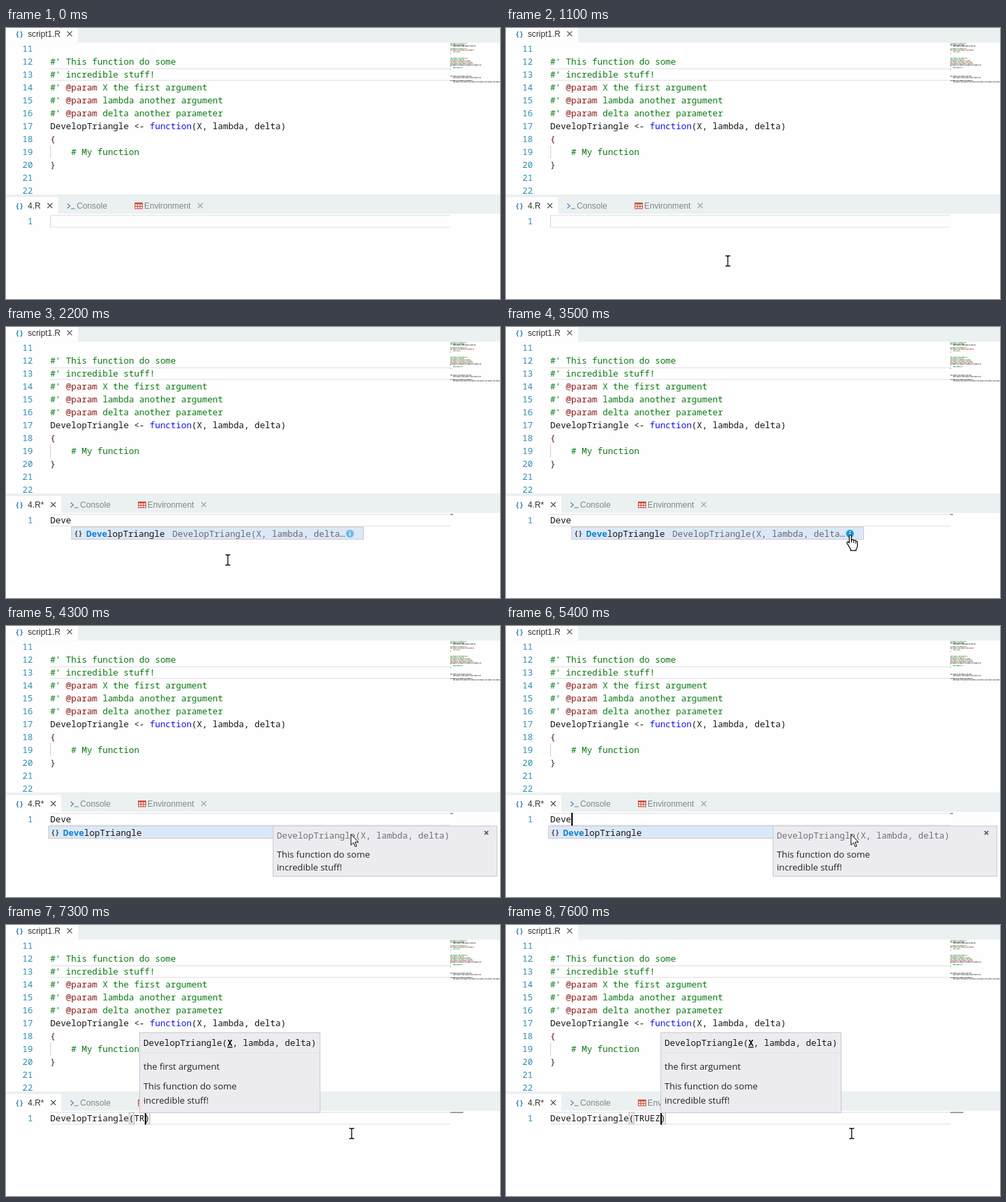
An HTML page for the animation above (8000 ms loop, 726 by 399 pixels).

```html
<!DOCTYPE html>
<html lang="en">
<head>
<meta charset="utf-8">
<title>Editor with completion</title>
<style>
html, body { margin: 0; width: 726px; height: 399px; overflow: hidden; background: #fefefe; }
svg { display: block; }
text { white-space: pre; }
.mono { font: 12.83px "Noto Sans Mono", monospace; }
.ui { font: 12.2px "Liberation Sans", Arial, sans-serif; }
.body { font: 13.25px "Open Sans", sans-serif; }
.icon { font: bold 10.5px "Noto Sans Mono", monospace; }
.bold { font-weight: bold; }
</style>
</head>
<body>
<svg width="726" height="399" viewBox="0 0 726 399">
  <g id="still"></g>
  <g id="live"></g>
</svg>
<script>
const LOOP = 8000, STEP = 100, CHAR = 7.7, LEFT = 65;
const BAR = '#ebf0f1', GREEN = '#0a7a14', RED = '#8a1515', BLUE = '#1010f0', INK = '#151515';
const still = document.getElementById('still'), live = document.getElementById('live');

const esc = s => s.replace(/&/g, '&amp;').replace(/</g, '&lt;');
const span = (s, fill, cls = '') => `<tspan class="${cls}" fill="${fill}">${esc(s)}</tspan>`;
const raw = (x, y, inner, cls = 'mono') => `<text x="${x}" y="${y}" class="${cls}">${inner}</text>`;
const text = (x, y, s, fill = INK, cls = 'mono') => raw(x, y, span(s, fill), cls);
const rect = (x, y, w, h, fill, stroke = 'none') =>
  `<rect x="${x}" y="${y}" width="${w}" height="${h}" fill="${fill}" stroke="${stroke}"/>`;
const panel = (x, y, w, h, fill) => rect(x + .5, y + .5, w - 1, h - 1, fill, '#c9c9cc');
const path = (d, stroke, width = 1, extra = '') =>
  `<path d="${d}" fill="none" stroke="${stroke}" stroke-width="${width}" ${extra}/>`;
const cross = (x, y, r, color, width = 1.1) =>
  path(`M${x - r} ${y - r}l${2 * r} ${2 * r}M${x + r} ${y - r}l${-2 * r} ${2 * r}`, color, width);
const lineBox = y => rect(LEFT, y, 588, 1.5, '#e9e9e9') + rect(LEFT, y + 17.2, 588, 1.5, '#e9e9e9');
const lineNo = (n, y) =>
  `<text x="39.5" y="${y}" text-anchor="end" class="mono" fill="#2b8fb3">${n}</text>`;

// ---------- upper editor ----------
function code() {
  const param = s => span("#' ", GREEN) + span('@param', RED) + span(s, GREEN);
  return [
    '',
    span("#' This function do some", GREEN),
    span("#' incredible stuff!", GREEN),
    param(' X the first argument'),
    param(' lambda another argument'),
    param(' delta another parameter'),
    span('DevelopTriangle <- ', INK) + span('function', BLUE) + span('(X, lambda, delta)', INK),
    span('{', '#5c1238'),
    span('    # My function', GREEN),
    span('}', '#42210f'),
    '', ''
  ].map((s, i) => lineNo(11 + i, 35 + 19 * i) + raw(LEFT, 54 + 19 * (i - 1), s)).join('');
}

function minimap() {
  const rows = [
    [23, 0, 24, GREEN], [25, 0, 21, INK], [26.5, 4, 33, INK],
    [30.5, 0, 24, GREEN], [32.5, 0, 35, RED], [35, 4, 11, GREEN], [37, 0, 1, INK],
    [44.5, 0, 25, GREEN], [46.5, 0, 20, GREEN], [48.5, 0, 30, RED], [50.5, 0, 33, GREEN],
    [52.5, 0, 33, RED], [54.5, 0, 46, INK], [56, 0, 1, INK], [58.5, 4, 14, GREEN], [61, 0, 1, INK],
    [71, 0, 31, INK], [73, 4, 41, INK], [77.5, 0, 33, INK], [79.3, 4, 69, INK]
  ];
  return rows.map(([y, x, w, color], i) => path(`M${653 + x} ${y}h${w}`, color, 1.1,
    `stroke-dasharray="${2 + i % 3} .8 5 .6 1.5 .9" opacity=".7"`)).join('');
}

still.innerHTML =
  rect(0, 0, 726, 399, '#fefefe') + rect(0, 0, 726, 21.5, BAR) + rect(0, 0, 106, 21.5, '#fefefe') +
  text(13.5, 12.5, '{}', '#2c80b4', 'icon') + text(32, 13, 'script1.R', '#333', 'ui') +
  cross(93.5, 8.5, 3.6, '#444') +
  lineBox(59.3) + rect(LEFT, 173, 1, 19, '#cfcfcf') + code() + minimap() +
  rect(0, 245, 726, 28.5, BAR);

// ---------- lower editor ----------
function tabs(dirty) {
  const d = dirty ? 5 : 0;
  const x = 189.5 + d;
  return rect(0, 249, 76.5 + d, 25, '#fefefe') +
    text(13.5, 265.5, '{}', '#2c80b4', 'icon') + text(32, 266, dirty ? '4.R*' : '4.R', '#333', 'ui') +
    cross(64.5 + d, 261.5, 3.6, '#333') +
    path(`M${90 + d} 258.5l4 3.5-4 3.5M${95.5 + d} 266h6`, '#4a87b0', 1.2) +
    text(104 + d, 266, 'Console', '#808585', 'ui') +
    rect(x, 257.5, 11, 8.5, '#fbe9e4', '#cb4a3c') + rect(x, 257.5, 11, 2, '#cb4a3c') +
    path(`M${x} 262.5h11M${x + 3.7} 258v8M${x + 7.4} 258v8`, '#cb4a3c') +
    text(203 + d, 266, 'Environment', '#808585', 'ui') + cross(285.5 + d, 261.5, 3.6, '#929797');
}

// name with its matched letters [from, to) in bold blue
function match(x, y, from, to) {
  const name = 'DevelopTriangle';
  return raw(x, y, span(name.slice(0, from), INK) + span(name.slice(from, to), '#0d7fd0', 'bold') +
    span(name.slice(to), INK));
}

function listRow(x, w, from, to) {
  return panel(x, 294, w, 19, '#dce8f7') + text(x + 4, 307.5, '{}', '#444', 'icon') +
    match(x + 22, 308.5, from, to);
}

function shortList(x, hover) {
  return listRow(x, 430, 0, 4) +
    text(x + 148.5, 308.5, 'DevelopTriangle(X, lambda, delta…', '#666a70') +
    `<circle cx="${x + 409.5}" cy="304.3" r="5.8" fill="${hover ? '#159bdc' : '#6fb9e6'}"/>` +
    path(`M${x + 409.5} 303.3v4.2M${x + 409.5} 300.6v1.5`, '#fff', 1.5);
}

function fullList(from, to) {
  return listRow(62, 331, from, to) + panel(392, 294, 330, 75, '#ecebf0') +
    text(398, 313, 'DevelopTriangle(X, lambda, delta)', '#717177') +
    cross(706, 304.5, 2.7, '#606060', 1.8) +
    text(398, 341.3, 'This function do some', '#222', 'body') +
    text(398, 360.2, 'incredible stuff!', '#222', 'body');
}

function signature(x) {
  const tx = x + 6;
  return panel(x, 158, 266, 119, '#ecebf0') +
    raw(tx, 178.3, span('DevelopTriangle(', INK) +
      `<tspan class="bold" text-decoration="underline">X</tspan>` + span(', lambda, delta)', INK)) +
    path(`M${x + 1} 188.5h264`, '#e2e1e6') +
    text(tx, 213, 'the first argument', '#222', 'body') +
    text(tx, 242, 'This function do some', '#222', 'body') +
    text(tx, 263, 'incredible stuff!', '#222', 'body');
}

const POINTER = {
  beam: path('M-3.5-7.5h2.5l1 1 1-1h2.5M0-6.5v13M-3.5 7.5h2.5l1-1 1 1h2.5', '#000', 1.3),
  arrow: '<path d="M0 0v16l3.7-3.5 2.6 6 2.2-1-2.5-5.8h5z" fill="#fff" stroke="#000"/>',
  hand: '<path d="M-1.5 1.5q1.5-2 3 0v7l1-.8q2-.5 2.5 1 2.5-1 3 1 2.5-.5 2.5 2v5q0 3-2 5v2h-8v-2' +
    'l-4.5-7.5q-2-2 0-3.5 1.5-.5 2.5 2z" fill="#fff" stroke="#000" stroke-width="1.2"/>' +
    path('M1.5 8v4M5 9v3.5M8 10.5v3', '#000')
};

// ---------- timeline ----------
const last = (table, t) => table.filter(row => row[0] <= t).pop() || table[0];

const TYPED = [
  [0, ''], [1400, 'D'], [1500, 'De'], [1600, 'Dev'], [1700, 'Deve'], [5700, 'DevelopTriangle'],
  [6000, 'DevelopTriangle()'], [7300, 'DevelopTriangle(TR)'],
  [7500, 'DevelopTriangle(TRUE)'], [7600, 'DevelopTriangle(TRUEZ)']
];
const CARET = [
  [0, 0], [600, 1], [1100, 0], [1400, 1], [2200, 0], [2700, 1], [3100, 0], [3600, 1], [4000, 0],
  [4500, 1], [4900, 0], [5400, 1], [6500, 0], [6900, 1]
];
const LIST = [
  [0, ''], [1800, 'short'], [3600, 'full'], [5700, ''], [7400, 'again'], [7500, '']
];
const HINT = [[0, 0], [6000, 188], [7300, 196], [7400, 204], [7500, 219], [7600, 227]];
const SHAPE = [
  [0, ''], [100, 'beam'], [3300, 'hand'], [3600, ''], [4300, 'arrow'], [5700, 'beam']
];
const PATH = [
  [100, 428, 218], [400, 408, 258], [700, 350, 326], [900, 326, 343], [2500, 326, 343],
  [2700, 390, 346], [2900, 490, 337], [3100, 543, 322], [3300, 517, 309], [3400, 506, 305.5],
  [4200, 506, 305.5], [4300, 507, 306.5], [5600, 507, 306.5], [5700, 508, 307], [LOOP, 508, 307]
];

function pointerAt(t) {
  const i = Math.max(1, PATH.findIndex(p => p[0] >= t));
  const [a, b] = [PATH[i - 1], PATH[i]];
  const k = Math.max(0, (t - a[0]) / (b[0] - a[0]));
  return [1, 2].map(n => a[n] + (b[n] - a[n]) * k);
}

function scene(t) {
  const typed = last(TYPED, t)[1], list = last(LIST, t)[1], hint = last(HINT, t)[1];
  const shape = last(SHAPE, t)[1];
  const call = typed.endsWith(')');
  const end = LEFT + CHAR * (typed.length - call);
  const bracket = x => rect(x + .5, 276, CHAR - .5, 17, '#eef0ee', '#b9b9b9');

  let out = tabs(typed) + lineBox(275.3) + lineNo(1, 289);
  if (!typed) out += rect(LEFT, 276, 1, 17, '#d2d2d2');
  else out += path(`M653 276h${Math.min(19, typed.length)}`, INK, 1.1, 'opacity=".75"');
  if (call) out += bracket(LEFT + CHAR * 15) + bracket(end);
  out += text(LEFT, 289, typed);
  if (last(CARET, t)[1]) out += rect(Math.round(end), 275, 2, 19, '#000');
  if (hint) out += signature(hint);
  if (list === 'short') out += shortList(96, t >= 3400);
  if (list === 'full') out += fullList(0, 4);
  if (list === 'again') out += fullList(7, 9);
  if (shape) out += `<g transform="translate(${pointerAt(t)})">${POINTER[shape]}</g>`;
  return out;
}

const start = performance.now();
let shown = -1;
function frame() {
  const t = Math.floor(Math.max(0, performance.now() - start) % LOOP / STEP) * STEP;
  if (t !== shown) live.innerHTML = scene(shown = t);
  requestAnimationFrame(frame);
}
frame();
</script>
</body>
</html>
```
